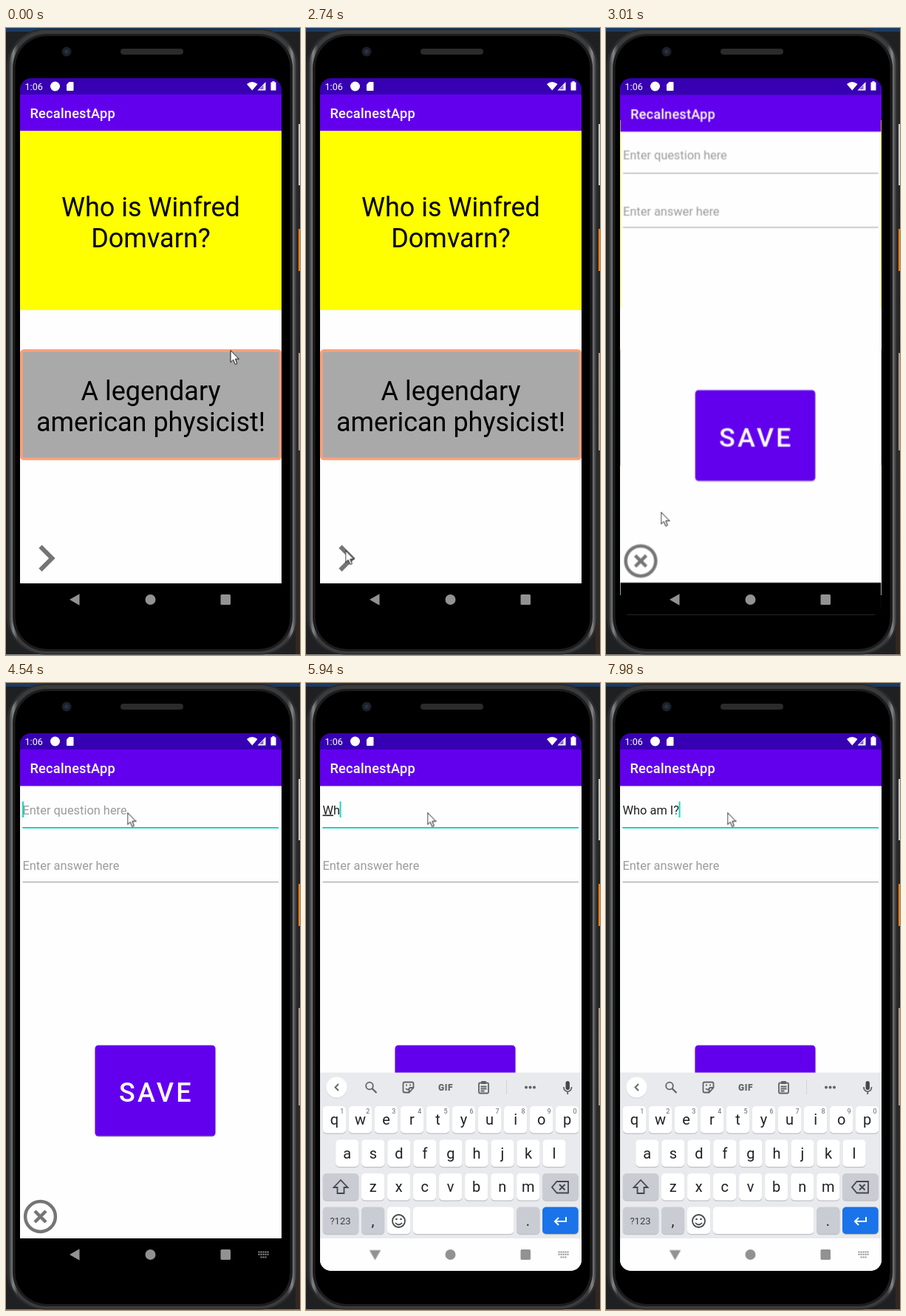
Animation of 398x849 px, one loop 8000 ms. Source, as an HTML page:

```html
<!DOCTYPE html>
<html lang="en">
<head>
<meta charset="utf-8">
<title>Flashcards on a phone</title>
<style>
  html, body { margin: 0; width: 100%; height: 100%; overflow: hidden; background: #1f2022; }
  svg { display: block; width: 398px; height: 849px; font-family: Roboto, sans-serif; }
  text { white-space: pre; }
  .big { font-size: 36px; text-anchor: middle; }
  .title { font-size: 18.2px; font-weight: 500; letter-spacing: .0125em; fill: #fff; }
  .field { font-size: 16.4px; fill: #222; }
  .hint { fill: #9b9b9b; }
  .typing { text-decoration: underline; text-decoration-thickness: 1px; }
  .letter { font-size: 20px; text-anchor: middle; fill: #202124; }
  .digit { font-size: 9px; text-anchor: middle; fill: #5f6368; }
  .window { transform-origin: 196px 432px; }
  #back { transform-origin: 93.5px 774px; }
</style>
</head>
<body>
<svg viewBox="0 0 398 849">
  <defs>
    <clipPath id="screen"><rect x="19" y="68" width="354" height="728" rx="15"/></clipPath>
    <linearGradient id="rim">
      <stop offset="0" stop-color="#303133"/><stop offset=".015" stop-color="#858688"/>
      <stop offset=".03" stop-color="#3a3b3d"/><stop offset=".97" stop-color="#3a3b3d"/>
      <stop offset=".985" stop-color="#858688"/><stop offset="1" stop-color="#303133"/>
    </linearGradient>
    <g id="bars">
      <rect x="19" y="68" width="354" height="728"/>
      <rect x="19" y="68" width="354" height="684" fill="#fefefe"/>
      <rect x="19" y="68" width="354" height="22" fill="#3700b3"/>
      <rect x="19" y="90" width="354" height="49.5" fill="#6200ee"/>
      <text class="title" x="32.5" y="122">RecalnestApp</text>
    </g>
  </defs>

  <!-- desktop behind the phone -->
  <rect width="398" height="5" fill="#1a3a62"/>
  <g id="desk">
    <rect x="392" y="130" width="6" height="83" fill="#c9c9c9"/>
    <rect x="392" y="272" width="6" height="57" fill="#f08010"/>
    <rect x="392" y="440" width="6" height="132" fill="#b59a8c"/>
    <rect x="392" y="572" width="6" height="277" fill="#33271f"/>
  </g>
  <rect y="848" width="398" height="1" fill="#8d8b86"/>

  <!-- phone body -->
  <rect x="1" y="1" width="395" height="847.5" rx="52" fill="#2a2b2d"/>
  <rect x="4" y="3" width="389" height="844" rx="50" fill="url(#rim)"/>
  <rect x="9" y="8" width="379" height="836" rx="46" fill="#1c1c1d"/>
  <rect x="12.5" y="11" width="372" height="830" rx="43"/>
  <circle cx="82" cy="32" r="6.5" fill="#1d1f24"/>
  <circle cx="82" cy="32" r="3" fill="#27304a"/>
  <rect x="155" y="28" width="85" height="8" rx="4" fill="#2b2b2c"/>

  <g clip-path="url(#screen)">
    <g id="home" class="window">
      <use href="#bars"/>
      <rect x="19" y="139.5" width="354" height="242.5" fill="#ff0"/>
      <text class="big" x="196" y="254.5">Who is Winfred</text>
      <text class="big" x="196" y="297">Domvarn?</text>
      <rect x="20.8" y="436.8" width="350.6" height="146.6" rx="3.5" fill="#a9a9a9" stroke="#ffa07a" stroke-width="3.6"/>
      <text class="big" x="196" y="503.5">A legendary</text>
      <text class="big" x="196" y="545.5">american physicist!</text>
      <path transform="translate(18.6 682) scale(3)" fill="#757575" d="M10 6 8.59 7.41 13.17 12 8.59 16.59 10 18 16 12z"/>
    </g>

    <g id="form" class="window" opacity="0">
      <use href="#bars"/>
      <text id="hint" class="field hint" x="22.5" y="177.5">Enter question here</text>
      <text class="field hint" x="22.5" y="253.3">Enter answer here</text>
      <path d="M22.5 196H369M22.5 269.5H369" stroke="#9a9a9a"/>
      <path id="focus" d="M22.5 196H369" stroke="#1cd3c2" stroke-width="2" opacity="0"/>
      <g id="entry"></g>
      <rect id="caret" x="22" y="160.5" width="2" height="21.5" fill="#1cd3c2" opacity="0"/>
      <rect x="120.5" y="492" width="163" height="123" rx="5" fill="#c9c9cc"/>
      <rect x="120.5" y="490.5" width="163" height="123" rx="4.5" fill="#6200ee"/>
      <text x="153" y="567" font-size="36" font-weight="500" letter-spacing="3.2" fill="#fff">SAVE</text>
      <circle cx="46.5" cy="722.5" r="20.4" fill="none" stroke="#757575" stroke-width="4.5"/>
      <path d="m39 715 15 15m0-15-15 15" stroke="#757575" stroke-width="4.5"/>
    </g>

    <g id="keyboard" opacity="0">
      <rect x="19" y="527.5" width="354" height="270" fill="#e8eaed"/>
      <g id="keys"></g>
      <circle cx="41.5" cy="548.5" r="14" fill="#d0d2d6"/>
      <circle cx="41.5" cy="547.5" r="14" fill="#fff"/>
      <g fill="none" stroke="#5f6368" stroke-width="1.8">
        <path d="m44 543-4.5 4.5L44 552"/>
        <circle cx="86" cy="545.5" r="4.8"/><path d="m89.5 549 6 6" stroke-width="2.2"/>
        <path d="M145.5 548v-5.500q0-2-2-2h-10q-2 0-2 2v10q0 2 2 2h6zh-4q-2 0-2 2v4.500M135 549q2.500 3 5 0"/>
        <path d="M136 543.500v2m5-2v2"/>
        <rect x="234" y="541.500" width="13" height="14" rx="1.500"/>
        <path d="M237 541.500h7M236.500 546.500h8m-8 3h8m-8 3h5"/>
        <path d="M349 547v1a5.200 5.200 0 0 0 10.400 0v-1M354.200 553.500v3.500"/>
      </g>
      <g fill="#5f6368">
        <rect x="237" y="539" width="7" height="4" rx="1"/>
        <rect x="351.500" y="539" width="5.400" height="12" rx="2.700" fill="#444746"/>
        <text x="189" y="551.500" font-size="12" font-weight="900" text-anchor="middle" letter-spacing=".6">GIF</text>
        <circle cx="298" cy="547.500" r="2"/><circle cx="303.500" cy="547.500" r="2"/><circle cx="309" cy="547.500" r="2"/>
      </g>
      <path d="M271.500 538v19" stroke="#cfd1d5"/>
      <g fill="none" stroke="#44474b" stroke-width="1.800">
        <path id="shift" d="m47 673-9.500 10h5v8h9v-8h5z"/>
        <path d="M339.500 675h15.500v15.500h-15.500l-6.500-7.750zM343 679l7.500 7.500m0-7.500-7.500 7.500"/>
        <circle cx="125.500" cy="728.500" r="8.500"/><path d="M121 731q4.500 5 9 0"/>
        <path d="M352 723v6h-15m5-5-5 5 5 5" stroke="#fff" stroke-width="2"/>
      </g>
      <circle cx="122.500" cy="726" r="1.300" fill="#44474b"/><circle cx="128.500" cy="726" r="1.300" fill="#44474b"/>
      <text x="46.500" y="733" font-size="13" text-anchor="middle" fill="#3c4043">?123</text>
      <text class="letter" x="90.500" y="735" font-size="18">,</text>
      <text class="letter" x="300.500" y="735" font-size="18">.</text>
    </g>
    <rect id="navbar" x="19" y="752" width="354" height="44" fill="#fefefe" opacity="0"/>
  </g>

  <!-- status icons -->
  <g fill="#fff">
    <text x="25.500" y="83.500" font-size="12.600">1:06</text>
    <circle cx="66.500" cy="79" r="6.500"/>
    <path d="M85.500 73h5q1 0 1 1v10q0 1-1 1h-7.500q-1 0-1-1v-7.500z"/>
    <path d="M326 76q7-6 14.500 0l-7.250 8.500z"/>
    <path d="M351.500 73v11.500H340.500z"/>
    <path d="M360.500 72h3v1.500h2v11h-7v-11h2z"/>
  </g>
  <path d="M348.500 77v6h-5.500z" fill="#3700b3" opacity=".6"/>

  <!-- navigation buttons -->
  <g fill="#929292">
    <path id="back" d="M86 774 99.500 766.300V781.700z"/>
    <circle cx="195.500" cy="774" r="7"/>
    <rect x="290.500" y="767" width="13.500" height="14" rx="1.500"/>
    <path id="ime" d="M341.500 770.500h14M341.500 773.700h14M344.500 777.500h8" stroke="#929292" stroke-width="2" stroke-dasharray="2 1" opacity="0"/>
  </g>

  <path id="pointer" d="M0 0V16.200L3.700 12.800 6.300 18.900 8.900 17.800 6.400 11.800H11.400z" fill="#fff" stroke="#111" stroke-width="1" stroke-linejoin="round"/>
</svg>
<script>
const LOOP = 8000;
const $ = id => document.getElementById(id);
const startTime = document.timeline.currentTime || 0;

// Holds each value from its time until the next one.
function hold(el, prop, rows) {
  const frames = rows.map(([t, v]) => ({ offset: t / LOOP, [prop]: v, easing: 'step-end' }));
  frames.push({ offset: 1, [prop]: rows[rows.length - 1][1] });
  el.animate(frames, { duration: LOOP, iterations: Infinity }).startTime = startTime;
}
const show = (el, from, to = LOOP) => hold(el, 'opacity',
  [[0, from ? 0 : 1], ...(from ? [[from, 1]] : []), ...(to < LOOP ? [[to, 0]] : [])]);

function add(parent, tag, attrs, text = '') {
  const el = document.createElementNS('http://www.w3.org/2000/svg', tag);
  for (const k in attrs) el.setAttribute(k, attrs[k]);
  el.textContent = text;
  return parent.appendChild(el);
}

// Keyboard
const keys = $('keys'), CAPS_ON = 7050, CAPS_OFF = 7200;
function key(x, y, width, fill = '#fff') {
  add(keys, 'rect', { x, y: y + 1.2, width, height: 36.5, rx: 5, fill: '#bfc1c6' });
  add(keys, 'rect', { x, y, width, height: 36.5, rx: 5, fill });
}
[['qwertyuiop', 22.8, 573], ['asdfghjkl', 40.2, 618.5], ['zxcvbnm', 75, 664]].forEach(([row, left, y], r) =>
  [...row].forEach((c, i) => {
    const x = left + i * 35.03, at = { class: 'letter', x: x + 15.6, y: y + 25 };
    key(x, y, 31.2);
    hold(add(keys, 'text', at, c), 'opacity', [[0, 1], [CAPS_ON, 0], [CAPS_OFF, 1]]);
    show(add(keys, 'text', at, c.toUpperCase()), CAPS_ON, CAPS_OFF);
    if (!r) add(keys, 'text', { class: 'digit', x: x + 26, y: y + 10 }, (i + 1) % 10);
  }));
const GREY = '#c9ccd3';
[[22.8, 664, 48.5, GREY], [320, 664, 48.7, GREY], [22.8, 709.5, 48.5, GREY], [75, 709.5, 31.2, GREY],
 [110, 709.5, 31.2], [145, 709.5, 136.3], [285.2, 709.5, 31.2, GREY], [320, 709.5, 48.7, '#1a73e8']]
  .forEach(k => key(...k));
hold($('shift'), 'fill', [[0, 'transparent'], [CAPS_ON, '#44474b'], [CAPS_OFF, 'transparent']]);

show($('keyboard'), 4790);
hold($('keyboard'), 'transform', [[0, 'translateY(80px)'], [4910, 'translateY(0px)']]);
show($('navbar'), 4790);
show($('ime'), 4420);
hold($('back'), 'transform', [[0, 0], [4910, -18], [5030, -65], [5150, -86], [5270, -90]]
  .map(([t, a]) => [t, `rotate(${a}deg)`]));

// Screen change
const scale = rows => rows.map(([t, s]) => [t, `scale(${s})`]);
hold($('home'), 'transform', scale([[0, 1], [2860, 1.0375], [3010, 1.05]]));
hold($('form'), 'transform', scale([[0, .9725], [3010, .997], [3160, .999], [3280, 1]]));
show($('form'), 2860);

// Typing: time, settled text, underlined text, newest text
const typed = [
  [5420, '', '', 'W'], [5790, '', 'W', ''], [5940, '', 'W', 'h'], [6190, '', 'Wh', 'o'],
  [6440, 'Who ', '', ''], [6560, 'Who ', '', 'a'], [6680, 'Who ', 'a', 'm'], [6800, 'Who am ', '', ''],
  [7050, 'Who am ', '', 'I'], [7320, 'Who am ', 'I', ''], [7720, 'Who am ', 'I', '?'], [7980, 'Who am I?', '', '']
];
const caretAt = [[0, 'translateX(0px)']];
typed.forEach(([t, ...parts], i) => {
  const line = add($('entry'), 'text', { class: 'field', x: 22.5, y: 177.5 });
  parts.forEach((s, n) => s && add(line, 'tspan', n === 1 ? { class: 'typing' } : {}, s));
  caretAt.push([t, `translateX(${line.getComputedTextLength()}px)`]);
  show(line, t, typed[i + 1] ? typed[i + 1][0] : LOOP);
});
hold($('caret'), 'transform', caretAt);
hold($('caret'), 'opacity', [[0, 0], [4280, 1], [4790, 0], [5270, 1]]);
show($('focus'), 4280);
show($('hint'), 0, 5420);

// Mouse pointer: time, x, y
hold($('pointer'), 'transform', [
  [0, 304, 436.5], [120, 287.5, 458], [270, 255, 480], [390, 200, 508], [510, 138.5, 525], [630, 190, 510],
  [750, 248, 488.5], [900, 225, 520], [1020, 180, 570], [1140, 125, 625], [1260, 80, 672], [1380, 50.5, 701],
  [1530, 50.5, 710], [1650, 50.5, 717], [2740, 53.5, 707.5], [2860, 60, 690], [3010, 74.5, 655.5],
  [3160, 95, 600], [3280, 130, 500], [3400, 165, 380], [3520, 186, 273], [3670, 188, 245], [3790, 182, 225],
  [3910, 172, 205], [4030, 166, 190], [4160, 164.5, 180], [4280, 164.5, 175.5]
].map(([t, x, y]) => [t, `translate(${x}px, ${y}px)`]));
</script>
</body>
</html>
```
